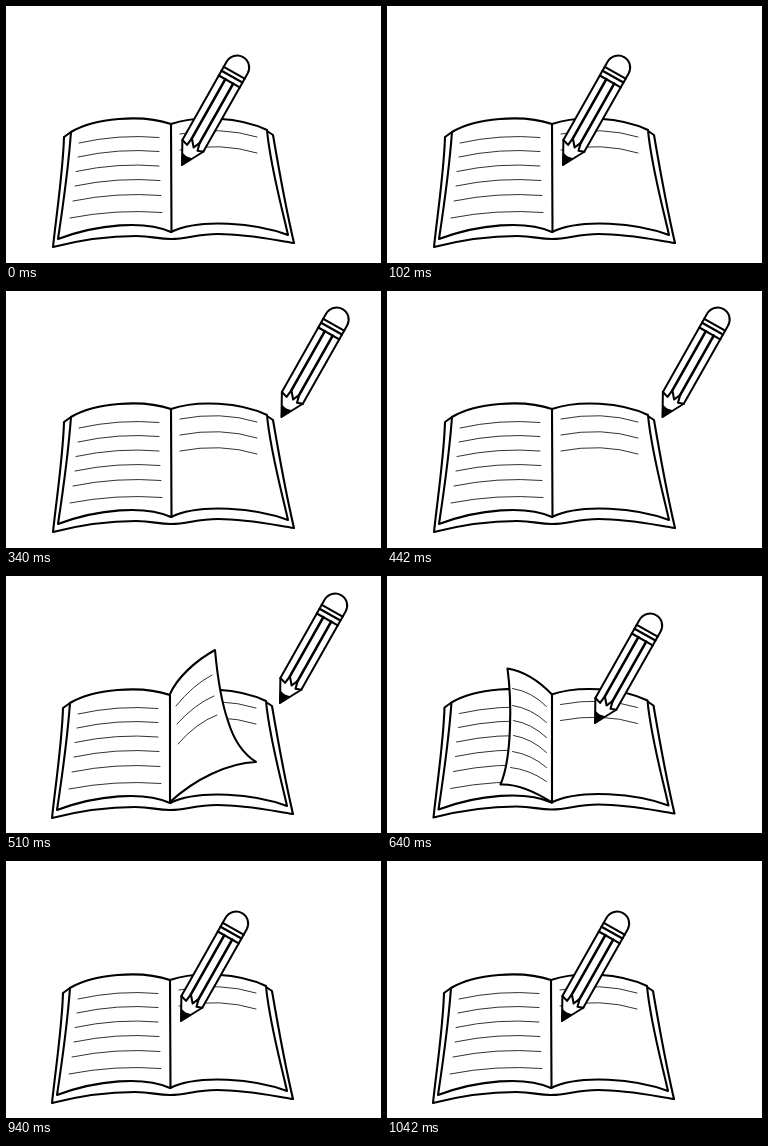
Write an HTML page with a canvas that moves like this. It is 375 px wide and 257 px high and loops after 1.11 s.

```html
<!DOCTYPE html>
<html lang="en">
<head>
<meta charset="utf-8">
<title>Notebook and pencil</title>
<style>
html, body { margin: 0; width: 100%; height: 100%; overflow: hidden; background: #fff; }
canvas { display: block; width: 375px; height: 257px; }
</style>
</head>
<body>
<canvas id="stage"></canvas>
<script>
const W = 375, H = 257, LOOP = 1110;
const canvas = document.getElementById('stage');
const ctx = canvas.getContext('2d');
const dpr = window.devicePixelRatio || 1;
canvas.width = W * dpr;
canvas.height = H * dpr;

// Each pose: end time, book offset, pencil tip, lines on the right page, turning page
const poses = [
  { end: 170, book: [0, 0], tip: [176, 159], rows: 2 },
  { end: 340, book: [-0.7, 1], tip: [251.5, 164], rows: 3 },
  { end: 510, book: [0, 0], tip: [275.5, 126], rows: 3 },
  { end: 640, book: [-1, 1], tip: [274, 127], rows: 2, leaf: 'lifted' },
  { end: 770, book: [-0.5, 0.5], tip: [208, 147], rows: 2, leaf: 'upright' },
  { end: 940, book: [0, 0], tip: [176, 159], rows: 2, leaf: 'falling' },
  { end: LOOP, book: [-1, 1], tip: [175, 160], rows: 2 }
];

const leaves = {
  lifted: {
    shape: 'M165 117C172 101 190 84 210 73C212 95 215 121 223 144C229 164 240 178 251 185C223 186 190 202 165 225Z',
    rows: ['M171 129Q188 108 207 98', 'M172 147Q190 127 209 119', 'M173 167Q191 146 212 138']
  },
  upright: {
    shape: 'M165.5 118C153 105 139 95 121 92C125 122 126 180 114 208C134 207 153 218 165.5 226Z',
    rows: ['M126 112Q145 115 160 130', 'M126 129Q145 132 160 146', 'M127 144Q145 147 160 161',
      'M127 159Q145 162 160 176', 'M126 175Q145 178 160 191', 'M124 191Q143 193 160 205']
  },
  falling: {
    shape: 'M165 118C156 103 118 105 70 103C76 140 75 175 60 212C105 202 143 204 165 226Z',
    rows: ['M84 117Q140 113 159 128', 'M84 132Q140 128 160 142', 'M83 147Q140 143 160 156',
      'M82 161Q140 157 160 171', 'M80 176Q140 172 160 186', 'M78 190Q140 187 159 201']
  }
};

const leftRows = [[73, 137, 153], [72, 151, 153], [70, 165.5, 153], [69, 180, 154], [67, 195, 155], [64, 212, 156]];

function ink(d, width = 2.1, fill) {
  const path = new Path2D(d);
  if (fill) {
    ctx.fillStyle = fill;
    ctx.fill(path);
  }
  ctx.lineWidth = width;
  ctx.strokeStyle = width < 1.5 ? '#333' : '#000';
  ctx.stroke(path);
}

function drawBook(rows) {
  ink('M65 126L58 131C57 165 51 204 47 241C82 232 106 230 130 230C147 230 151 233 165 233C182 233 190 228 212 228C240 228 263 233 288 237C279 199 273 164 267 129L261 125', 2.1, '#fff');
  ink('M65 126C88 112 136 108 165 118C191 109 234 111 261 124C264 158 274 194 282 229C250 217 194 212 165 226C139 214 92 218 52 233C57 200 62 166 65 126Z', 2.1, '#fff');
  ink('M165 118L165.5 226');
  for (const [x, y, end] of leftRows) {
    ink(`M${x} ${y}Q${(x + end) / 2} ${y - 9} ${end} ${y - 5.5}`, 1);
  }
  for (let i = 0; i < rows; i++) {
    const y = 128 + 16 * i;
    ink(`M174 ${y}Q215 ${y - 8} 251 ${y + 3}`, 1);
  }
}

function drawLeaf({ shape, rows }) {
  ink(shape, 2.1, '#fff');
  rows.forEach(row => ink(row, 1));
}

function drawPencil([x, y]) {
  ctx.save();
  ctx.translate(x, y);
  ctx.rotate(29.5 * Math.PI / 180);
  ink('M0 0L-12 -22V-112A12 12 0 0 1 12 -112V-22Z', 2, '#fff');
  ink('M-12 -22L-5.5 -20L-4.5 -28L1.5 -21L4.5 -28L6.5 -20L12 -22');
  ink('M-4.5 -28V-96M4.5 -28V-96', 2.6);
  ink('M-12 -96H12M-12 -101.5H12M-12 -106H12', 2.2);
  ink('M0 0L-5 -10Q0 -8 5 -10Z', 1.5, '#000');
  ctx.restore();
}

function draw(now) {
  const t = now % LOOP;
  const pose = poses.find(p => t < p.end);
  ctx.setTransform(dpr, 0, 0, dpr, 0, 0);
  ctx.fillStyle = '#fff';
  ctx.fillRect(0, 0, W, H);
  ctx.lineCap = ctx.lineJoin = 'round';
  ctx.save();
  ctx.translate(...pose.book);
  drawBook(pose.rows);
  if (pose.leaf) drawLeaf(leaves[pose.leaf]);
  ctx.restore();
  drawPencil(pose.tip);
}

const start = performance.now();
function tick() {
  draw(performance.now() - start);
  requestAnimationFrame(tick);
}
tick();
</script>
</body>
</html>
```
